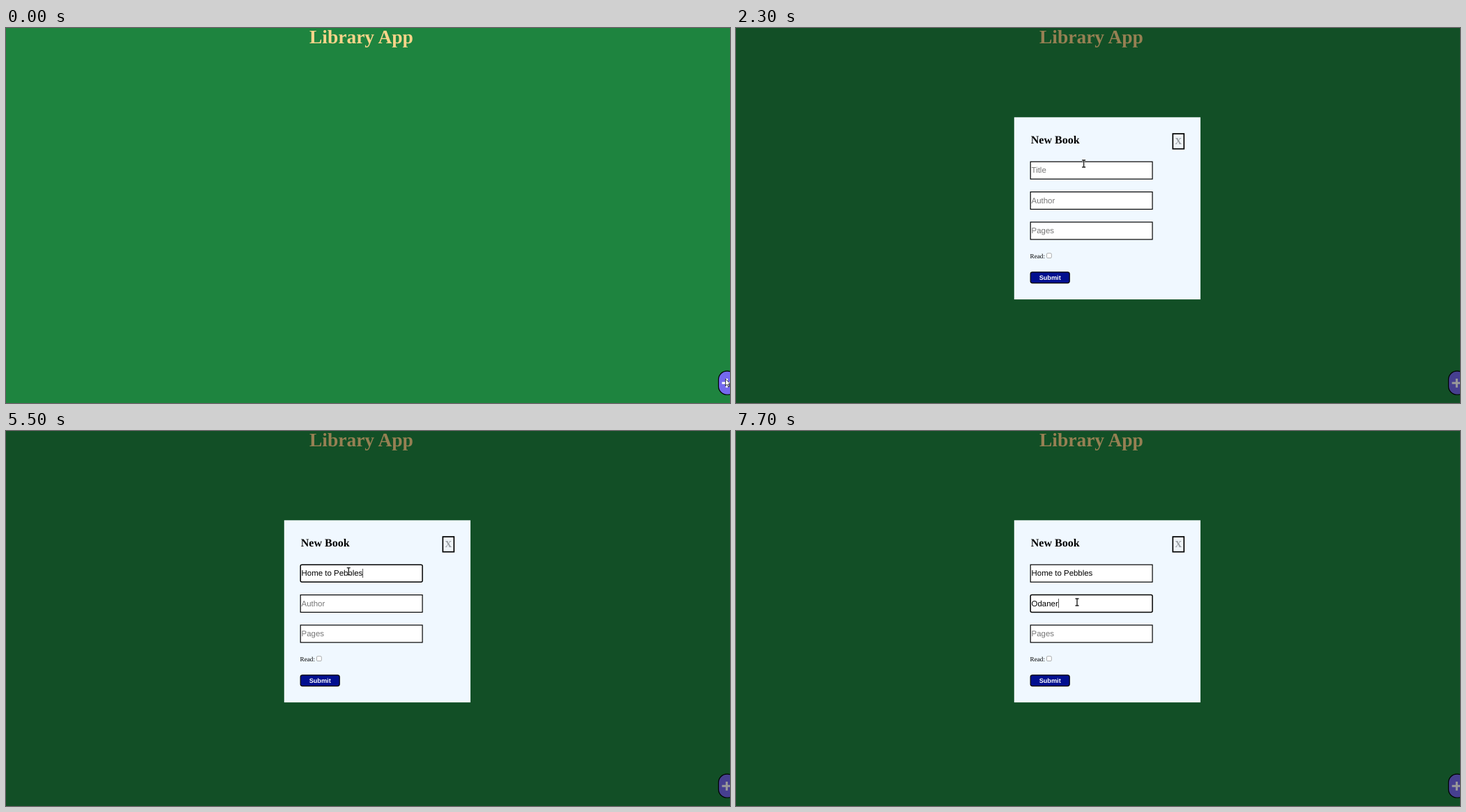
Animation of 1038 by 539 pixels, one loop 8 s. Source, as an HTML page:

```html
<!DOCTYPE html>
<html lang="en">
<head>
<meta charset="utf-8">
<title>Library App</title>
<style>
  html, body { margin: 0; width: 100%; height: 100%; overflow: hidden; background: #1e843f; }
  svg { display: block; width: 100vw; height: 100vh; }
  .serif { font-family: "Liberation Serif", "Times New Roman", serif; }
  .sans { font-family: "Liberation Sans", Arial, sans-serif; }
  .bold { font-weight: bold; }
  .menu { filter: drop-shadow(0 1px 1.2px rgba(0, 0, 0, .28)); }
  text { white-space: pre; text-rendering: geometricPrecision; }
</style>
</head>
<body>
<svg viewBox="0 0 1038 539" preserveAspectRatio="none">
  <rect width="1038" height="539" fill="#1e843f"/>
  <text class="serif bold" x="509.4" y="22.1" font-size="27.48" fill="#f9d48a" text-anchor="middle">Library App</text>
  <rect x="1021.5" y="493.2" width="25" height="33.8" rx="12" fill="#7469ee" stroke="#000" stroke-width="1.2"/>
  <path d="M1026.5 510.3H1040M1033.3 504V516.8" stroke="#fff" stroke-width="3"/>

  <g id="modal">
    <rect width="1038" height="539" fill="#000" fill-opacity=".4"/>
    <rect x="398.8" y="128.3" width="267.1" height="261.8" fill="#f0f8ff"/>
    <text class="serif bold" x="422.8" y="165.7" font-size="16">New Book</text>
    <rect x="626.3" y="152" width="16" height="21.7" fill="#eff4f8" stroke="#000" stroke-width="1.7"/>
    <text class="serif bold" x="634.2" y="167.4" font-size="13.74" fill="#9a9fa3" text-anchor="middle">X</text>
    <g id="fields"></g>
    <text class="serif" x="421.6" y="331" font-size="9.16">Read:</text>
    <rect x="445.5" y="323.8" width="6.8" height="6.8" rx="1.4" fill="#fff" stroke="#767676" stroke-width=".6"/>
    <rect x="422.2" y="350.8" width="56" height="15.8" rx="2.8" fill="#020f8f" stroke="#000" stroke-width="1.2"/>
    <text class="sans bold" x="450.2" y="361.8" font-size="9.16" fill="#fff" text-anchor="middle">Submit</text>
    <g id="menu">
      <rect class="menu" x="421.2" y="218" width="176.6" height="30" fill="#fbfbfb"/>
      <text class="sans" x="428.6" y="235.6" font-size="7.6" fill="#444">s</text>
    </g>
    <rect id="caret" width="1" height="13" fill="#000" fill-opacity=".65"/>
  </g>

  <path id="arrow" d="M0 0V10L2.4 7.9L4 11.4L5.7 10.7L4.1 7.3H7.3Z" fill="#fff" stroke="#000" stroke-width=".8"/>
  <g id="beam" fill="none">
    <path d="M-2.5-5H2.5M0-5V5M-2.5 5H2.5" stroke="#fff" stroke-width="2.4" stroke-opacity=".8"/>
    <path d="M-2.5-5H2.5M0-5V5M-2.5 5H2.5" stroke="#222" stroke-width="1.4"/>
  </g>
</svg>
<script>
const LOOP = 8000, PITCH = 43.4, TEXT_X = 423.6, FONT_SIZE = 11.45;
const BOOK = "Home to Pebbles", AUTHOR = "Odaner";

// Each track lists [start time, value...]; a value holds until the next start.
const bookTyping = [[0, 0], [3700, 1], [4000, 5], [4300, 6], [4600, 8], [5000, 11], [5300, 14], [5500, 15]];
const authorTyping = [[0, 0], [7400, 3], [7700, 6]];
const focusTrack = [[0, -1], [2800, 0], [7000, 1]];
const caretTrack = [[0, 0], [2800, 1], [3400, 0], [3700, 1], [6300, 0], [7000, 1]];
const menuTrack = [[0, 0], [2800, 1], [3700, .25], [4000, 0], [7000, 1], [7400, 0]];
const pointerTrack = [
  [0, "arrow", 1031.6, 504.4],
  [1700, "arrow", 850, 406],
  [1800, "arrow", 660, 304],
  [1900, "arrow", 578.5, 263.5],
  [2100, "beam", 547, 240],
  [2200, "beam", 515, 209],
  [2300, "beam", 498.6, 195],
  [2400, "beam", 493.5, 199],
  [2500, "beam", 491.2, 201.6],
  [6300, "arrow", 488, 222],
  [6600, "beam", 489, 246]
];

const byId = id => document.getElementById(id);
const modal = byId("modal"), menu = byId("menu"), caret = byId("caret");
const pointers = { arrow: byId("arrow"), beam: byId("beam") };
const ruler = document.createElement("canvas").getContext("2d");
ruler.font = `${FONT_SIZE}px "Liberation Sans", Arial, sans-serif`;

function add(parent, tag, attrs) {
  const el = document.createElementNS("http://www.w3.org/2000/svg", tag);
  for (const key in attrs) el.setAttribute(key, attrs[key]);
  return parent.appendChild(el);
}

const fields = ["Title", "Author", "Pages"].map((hint, i) => {
  const y = 191.6 + i * PITCH;
  const box = add(byId("fields"), "rect", {
    x: 422.2, y: y + .6, width: 174.8, height: 24.9, fill: "#fff", stroke: "#000"
  });
  const label = add(byId("fields"), "text", {
    class: "sans", x: TEXT_X, y: y + 16.7, "font-size": FONT_SIZE
  });
  return { hint, box, label };
});

function at(track, t) {
  let current = track[0];
  for (const step of track) if (step[0] <= t) current = step;
  return current.slice(1);
}

function show(el, visible) {
  el.setAttribute("visibility", visible ? "visible" : "hidden");
}

function render(t) {
  const [focus] = at(focusTrack, t);
  const values = [BOOK.slice(0, at(bookTyping, t)[0]), AUTHOR.slice(0, at(authorTyping, t)[0]), ""];
  modal.setAttribute("display", t < 800 ? "none" : "inline");

  fields.forEach(({ hint, box, label }, i) => {
    box.setAttribute("rx", i === focus ? 2 : 0);
    box.setAttribute("stroke-width", i === focus ? 1.5 : 1.2);
    label.textContent = values[i] || hint;
    label.setAttribute("fill", values[i] ? "#000" : "#757575");
  });

  const row = Math.max(focus, 0);
  menu.setAttribute("transform", `translate(0 ${row * PITCH})`);
  menu.setAttribute("opacity", at(menuTrack, t)[0]);
  caret.setAttribute("x", Math.round(TEXT_X + ruler.measureText(values[row]).width));
  caret.setAttribute("y", Math.round(198 + row * PITCH));
  show(caret, at(caretTrack, t)[0]);

  const [shape, x, y] = at(pointerTrack, t);
  for (const name in pointers) show(pointers[name], name === shape);
  pointers[shape].setAttribute("transform", `translate(${x} ${y})`);
}

const start = performance.now();
function tick() {
  render((performance.now() - start) % LOOP);
  requestAnimationFrame(tick);
}
tick();
</script>
</body>
</html>
```
